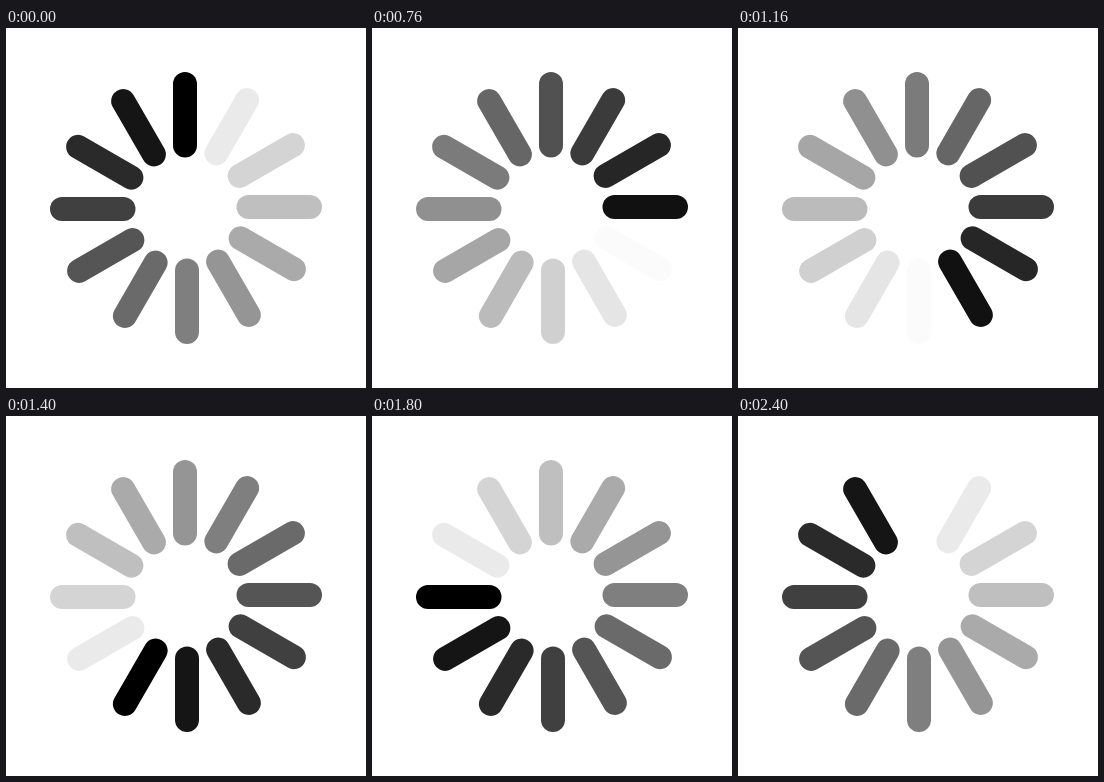
Write an HTML page without scripts that moves like this. It is 360x360 px and loops after 2440 ms.

```html
<!DOCTYPE html>
<html lang="en">
<head>
<meta charset="utf-8">
<title>Loading spinner</title>
<style>
  @property --tick {
    syntax: "<number>";
    inherits: true;
    initial-value: 0;
  }

  html, body {
    margin: 0;
    width: 100%;
    height: 100%;
    overflow: hidden;
    background: #fff;
  }

  svg {
    display: block;
    width: 100%;
    height: 100%;
    animation: count 2440ms steps(61) -1ms infinite;
  }

  @keyframes count {
    from { --tick: 0; }
    to { --tick: 61; }
  }

  /* Each bar turns black 5 ticks after the one before it, then fades over 60 ticks. */
  .bar {
    --age: calc(var(--tick) - 5 * var(--i));
    transform: rotate(calc(30deg * var(--i)));
    transform-origin: 180px 180px;
    opacity: calc(clamp(0, (var(--age) + 0.5) * 99, 1) - var(--age) / 60);
  }
</style>
</head>
<body>
<svg viewBox="0 0 360 360">
  <defs>
    <rect id="bar" x="167" y="44" width="24" height="85.5" rx="12"/>
  </defs>
  <use class="bar" href="#bar" style="--i: 0"/>
  <use class="bar" href="#bar" style="--i: 1"/>
  <use class="bar" href="#bar" style="--i: 2"/>
  <use class="bar" href="#bar" style="--i: 3"/>
  <use class="bar" href="#bar" style="--i: 4"/>
  <use class="bar" href="#bar" style="--i: 5"/>
  <use class="bar" href="#bar" style="--i: 6"/>
  <use class="bar" href="#bar" style="--i: 7"/>
  <use class="bar" href="#bar" style="--i: 8"/>
  <use class="bar" href="#bar" style="--i: 9"/>
  <use class="bar" href="#bar" style="--i: 10"/>
  <use class="bar" href="#bar" style="--i: 11"/>
</svg>
</body>
</html>
```
